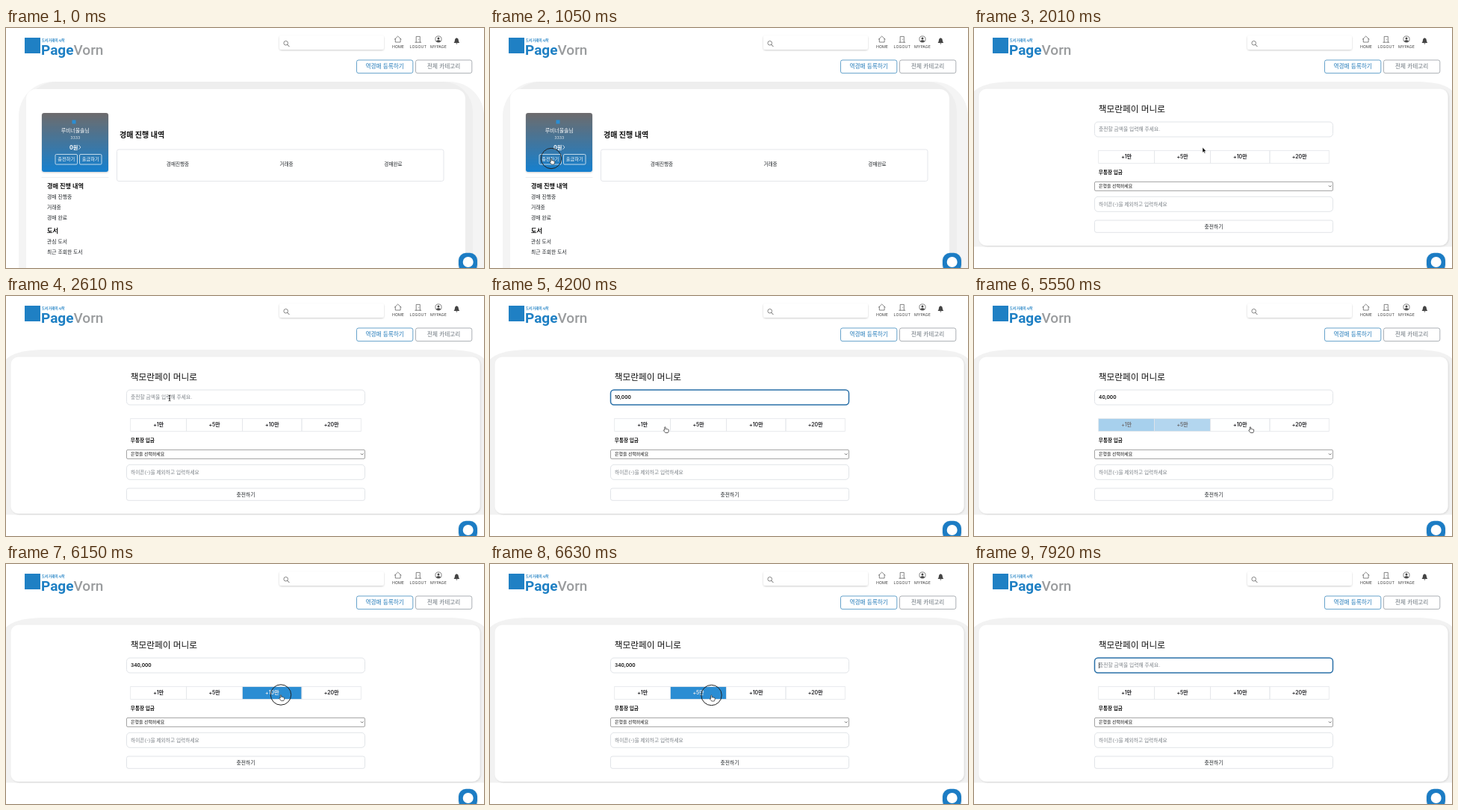
These frames come from a looping animation (640x322 px, 8 s). An HTML page:

```html
<!DOCTYPE html>
<html lang="ko">
<head>
<meta charset="utf-8">
<title>도서 경매</title>
<style>
  html, body { margin: 0; width: 100%; height: 100%; overflow: hidden; background: #fff; }
  svg { display: block; width: 640px; height: 322px; font-family: Inter, "Noto Sans CJK KR", "Noto Sans CJK", sans-serif; }
</style>
</head>
<body>
<svg id="stage" viewBox="0 0 640 322"></svg>
<script>
const LOOP = 8000, BLUE = '#2b8dd3', LINE = '#e1e4e8', INK = '#212529', MUTED = '#7b8187';

// Text centred vertically on cy
const text = (x, cy, size, str, { fill = INK, weight = 400, anchor = 'start', id = '' } = {}) =>
  `<text ${id && `id="${id}"`} x="${x}" y="${cy + size * 0.37}" font-size="${size}" fill="${fill}" font-weight="${weight}" text-anchor="${anchor}">${str}</text>`;
const mid = (x, cy, size, str, opts = {}) => text(x, cy, size, str, { ...opts, anchor: 'middle' });
const box = (x, y, w, h, r, fill, stroke = 'none', extra = '') =>
  `<rect x="${x}" y="${y}" width="${w}" height="${h}" rx="${r}" fill="${fill}" stroke="${stroke}" ${extra}/>`;
const line = (d, stroke = '#444', width = 0.65) =>
  `<path d="${d}" fill="none" stroke="${stroke}" stroke-width="${width}" stroke-linecap="round" stroke-linejoin="round"/>`;

const defs = `<defs>
  <linearGradient id="cardFill" x1="0" y1="0" x2="0" y2="1">
    <stop offset="0" stop-color="#6d6b6c"/><stop offset="1" stop-color="#1680cf"/>
  </linearGradient>
  <filter id="soft" x="-20%" y="-50%" width="140%" height="200%">
    <feDropShadow dx="0" dy="1" stdDeviation="1" flood-opacity=".2"/>
  </filter>
  <filter id="panelShadow" x="-5%" y="-5%" width="110%" height="110%">
    <feDropShadow dx="1" dy="1" stdDeviation="1" flood-opacity=".12"/>
  </filter>
</defs>`;

const header = `
  ${box(25, 13, 21, 21, 0, '#1f80c4')}
  ${text(48, 16, 4.4, '도서 거래의 시작', { fill: '#1f80c4', weight: 700 })}
  <text x="47" y="36.3" font-size="19" font-family="Roboto, sans-serif" font-weight="700" fill="#1f80c4">Page<tspan font-weight="500" fill="#9a9c9e">Vorn</tspan></text>
  ${box(366, 10, 140, 19, 3, '#fff', 'none', 'filter="url(#soft)"')}
  <circle cx="374.7" cy="20.2" r="2.8" fill="none" stroke="#555" stroke-width=".7"/>
  ${line('M376.8 22.3 L379.2 24.8', '#555', 0.9)}
  ${line('M520.3 15.2 L524.7 11 L529.1 15.2 M521.3 14.4 V19 H528.1 V14.4')}
  ${line('M547.8 19.2 H555.8 M549.2 19 V11.4 H554.3 V19 M552.6 15.2 V15.4')}
  <circle cx="579" cy="15" r="4.1" fill="none" stroke="#444" stroke-width=".65"/>
  <circle cx="579" cy="14" r="1.5" fill="#444"/>
  <path d="M575.9 17.7 Q579 14.9 582.1 17.7 Q579 20.4 575.9 17.7Z" fill="#444"/>
  <path d="M599.6 20 Q601 18.5 601 16 Q601 13.6 603.4 13.2 Q605.8 13.6 605.8 16 Q605.8 18.5 607.2 20Z M602.2 20.6 H604.6 Q603.4 22.8 602.2 20.6Z" fill="#444"/>
  ${mid(525, 25, 5.3, 'HOME', { fill: '#444' })}
  ${mid(551.7, 25, 5.3, 'LOGOUT', { fill: '#444' })}
  ${mid(579, 25, 5.3, 'MYPAGE', { fill: '#444' })}
  ${box(469.5, 43, 75.3, 17.6, 2.5, '#fff', '#3f8cbe', 'stroke-width=".8"')}
  ${mid(507.2, 51.6, 7.65, '역경매 등록하기', { fill: '#1f78b8' })}
  ${box(548.5, 43, 75.3, 17.6, 2.5, '#fff', '#969ba1', 'stroke-width=".8"')}
  ${mid(586.1, 51.6, 7.65, '전체 카테고리', { fill: '#6c757d' })}`;

const sideItem = (cy, str) => text(55, cy, 6.8, str);
const sideHead = (cy, str) => text(55, cy, 8.2, str, { weight: 700, fill: '#111' });
const cardButton = (x, str) =>
  box(x, 169.5, 29.5, 13.5, 1.5, 'none', '#e8f1f8', 'stroke-width=".8"') + mid(x + 14.75, 176.2, 6.2, str, { fill: '#fff' });

const myPage = `<g id="myPage">
  ${box(17, 72, 623, 300, 46, '#f4f4f4')}
  ${box(27, 72, 598, 300, 40, '#eeeeee')}
  ${box(27, 82, 588, 300, 13, '#fff')}
  ${box(48, 114, 89, 79, 3, 'url(#cardFill)', 'none', 'filter="url(#soft)"')}
  ${box(88.5, 123.5, 5, 5, 0, '#2b8dd3')}
  ${mid(92.7, 137.2, 6.9, '루비너울솔님', { fill: '#fff' })}
  ${mid(92.7, 147, 5.3, '3333', { fill: '#e4e8ec' })}
  ${text(85, 160, 7.2, '0원', { fill: '#fff', weight: 700 })}
  ${line('M97.6 157.4 L100 160 L97.6 162.6', '#fff', 0.7)}
  ${cardButton(66, '충전하기')}${cardButton(98.5, '출금하기')}
  ${line('M48 200.5 H137', '#e9ebed', 0.8)}
  ${sideHead(211.6, '경매 진행 내역')}
  ${sideItem(226, '경매 진행중')}${sideItem(240.3, '거래중')}${sideItem(254.5, '경매 완료')}
  ${sideHead(272, '도서')}
  ${sideItem(286, '관심 도서')}${sideItem(300.2, '최근 조회한 도서')}
  ${text(152, 143.3, 10.05, '경매 진행 내역', { weight: 700, fill: '#111' })}
  ${box(148.5, 163, 437.5, 42.5, 2.5, '#fff', LINE, 'stroke-width=".9"')}
  ${mid(230, 182.2, 6.6, '경매진행중')}${mid(375.5, 182.2, 6.6, '거래중')}${mid(518.5, 182.2, 6.6, '경매완료')}
</g>`;

const edges = [166.7, 241.5, 316.5, 396, 475.3];
const amounts = ['+1만', '+5만', '+10만', '+20만'].map((label, i) => {
  const x = edges[i], w = edges[i + 1] - x;
  return `<rect id="fill${i}" x="${x}" y="164.5" width="${w}" height="17" fill="${BLUE}"/>` +
    box(x, 164.5, w, 17, 0, 'none', '#e4e7ea', 'stroke-width=".8"') +
    mid(x + w / 2, 172.8, 6.9, label, { weight: 600, id: 'amount' + i });
}).join('');

const chargePage = `<g id="chargePage">
  <path d="M0 293.5 V85 Q12 73 48 72 H596 Q630 73 640 84 V293.5Z" fill="#f2f2f2"/>
  ${box(6.5, 81.7, 628, 210.3, 10, '#fff', 'none', 'filter="url(#panelShadow)"')}
  ${text(166.7, 109, 11.7, '책모란페이 머니로', { fill: '#111' })}
  ${box(161.5, 126, 319, 20, 4.5, '#fff', LINE, 'id="field"')}
  ${text(167, 136, 6.75, '충전할 금액을 입력해 주세요.', { fill: MUTED, id: 'hint' })}
  ${text(167, 136, 6.6, '', { weight: 600, fill: '#111', id: 'value' })}
  <rect id="caret" y="132" width=".7" height="8" fill="#111"/>
  ${amounts}
  ${text(166.8, 193.8, 6.64, '무통장 입금', { weight: 700, fill: '#111' })}
  ${box(161.5, 206.4, 319, 12, 1.5, '#fff', '#858585', 'stroke-width=".75"')}
  ${text(167, 212.2, 5.93, '은행을 선택하세요', { fill: '#111' })}
  ${line('M475.2 211.6 L476.7 213.1 L478.2 211.6', '#333', 0.7)}
  ${box(161.5, 226.3, 319, 20, 4.5, '#fff', LINE)}
  ${text(167, 236.3, 6.7, '하이픈(-)을 제외하고 입력하세요', { fill: MUTED })}
  ${box(161.5, 258, 319, 16.3, 2.5, '#fff', LINE)}
  ${mid(321, 266.1, 6.8, '충전하기')}
</g>`;

const chat = box(606, 301.8, 25, 26, 10, '#1a7cc4', 'none', 'filter="url(#soft)"') +
  '<circle cx="618.7" cy="314" r="7" fill="#fff"/>';

const pointer = `<g id="pointer">
  <circle id="ring" r="13.7" fill="none" stroke="#222" stroke-width="1"/>
  <path id="arrow" d="M0 0 V7 L1.6 5.6 L2.7 8 L3.8 7.5 L2.7 5.2 L4.8 5.1Z" fill="#000" stroke="#fff" stroke-width=".5"/>
  <path id="hand" d="M-.8 .6 Q0 -.4 .7 .6 V3 Q1.6 2.3 2.2 3.2 Q3 2.6 3.5 3.5 Q4.6 3 4.7 4.3 Q4.9 6 3.7 8 H.3 Q-1 6.2 -2.2 5 Q-2 3.6 -.8 4.6Z" fill="#fff" stroke="#222" stroke-width=".7"/>
  <path id="beam" d="M-1.4 -3.8 Q0 -3.8 0 -2.8 Q0 -3.8 1.4 -3.8 M0 -2.8 V2.8 M-1.4 3.8 Q0 3.8 0 2.8 Q0 3.8 1.4 3.8 M-.9 .8 H.9" fill="none" stroke="#111" stroke-width=".8"/>
</g>`;

document.getElementById('stage').innerHTML = defs + header + myPage + chargePage + chat + pointer;
const $ = id => document.getElementById(id);
const show = (id, on) => { $(id).style.display = on ? '' : 'none'; };

const PAGE_CHANGE = 1260;
const path = [ // time, x, y
  [390, 300, 240], [960, 82, 175], [1350, 82, 175], [2010, 306, 160.2], [2580, 219, 137],
  [3960, 219, 137], [4200, 234.5, 175.5], [5390, 233, 175.5], [5445, 241.5, 175.5], [5530, 317, 175.5],
  [5550, 370, 175.5], [6180, 368, 175.5], [6390, 296.5, 176], [6750, 296.5, 176], [7140, 219, 137]
];
const clicks = [1050, 2690, 4440, 4740, 5090, 5690, 5890, 6090, 6600, 7200];
const values = [ // time, amount
  [0, 0], [3060, 1], [3190, 10], [3320, 100], [3450, 1000], [3600, 10000],
  [4510, 20000], [4810, 30000], [5160, 40000], [5750, 140000], [5950, 240000], [6150, 340000], [6700, 390000],
  [7400, 39000], [7480, 3900], [7560, 390], [7640, 39], [7720, 3], [7800, 0]
];
const hovers = [ // enter, leave for each amount button
  [[4200, 5445]], [[5445, 5530], [6330, 6870]], [[5550, 6300]], []
];
const within = (t, a, b) => t >= a && t < b;
const clamp = v => Math.min(1, Math.max(0, v));

function position(t) {
  const i = path.findIndex(p => p[0] > t);
  if (i < 0) return path[path.length - 1].slice(1);
  if (i === 0) return path[0].slice(1);
  const [a, b] = [path[i - 1], path[i]];
  const u = (t - a[0]) / (b[0] - a[0]), e = u * u * (3 - 2 * u);
  return [a[1] + (b[1] - a[1]) * e, a[2] + (b[2] - a[2]) * e];
}

function hoverLevel(t, spans, fade = 180) {
  return Math.max(0, ...spans.map(([enter, leave]) =>
    clamp((Math.min(t, leave) - enter) / fade) - Math.max(0, t - leave) / fade));
}

function cursorKind(t, x, y) {
  if (t < PAGE_CHANGE) return within(x, 66, 96) && within(y, 169, 184) ? 'hand' : 'arrow';
  if (!within(x, 161, 481)) return 'arrow';
  if (within(y, 126, 147)) return 'beam';
  return within(y, 164.5, 182) ? 'hand' : 'arrow';
}

function draw(t) {
  const charging = t >= PAGE_CHANGE;
  show('myPage', !charging);
  show('chargePage', charging);

  const [changed, amount] = values.filter(v => v[0] <= t).pop();
  const focused = within(t, 2700, 4450) || t >= 7210;
  const label = $('value');
  label.textContent = amount ? amount.toLocaleString('en-US') : '';
  show('hint', !amount);
  $('field').setAttribute('stroke', focused ? '#2a70a8' : LINE);
  $('field').setAttribute('stroke-width', focused ? 1.5 : 1);
  const lastInput = Math.max(changed, t < 7210 ? 2700 : 7210);
  show('caret', focused && (t - lastInput) % 1000 < 500);
  if (charging) $('caret').setAttribute('x', 167 + (amount ? label.getComputedTextLength() + 0.3 : 0));

  hovers.forEach((spans, i) => {
    const level = hoverLevel(t, spans);
    $('fill' + i).setAttribute('opacity', level);
    const c = Math.round(33 + 200 * level);
    $('amount' + i).setAttribute('fill', `rgb(${c},${c},${c + 4})`);
  });

  const [x, y] = position(t), kind = cursorKind(t, x, y);
  show('pointer', within(t, 390, 3050) || within(t, 3960, 7390));
  $('pointer').setAttribute('transform', `translate(${x} ${y})`);
  ['arrow', 'hand', 'beam'].forEach(k => show(k, k === kind));
  show('ring', clicks.some(c => within(t, c, c + 110)));
}

const start = performance.now();
function tick() {
  draw((performance.now() - start) % LOOP);
  requestAnimationFrame(tick);
}
tick();
</script>
</body>
</html>
```
